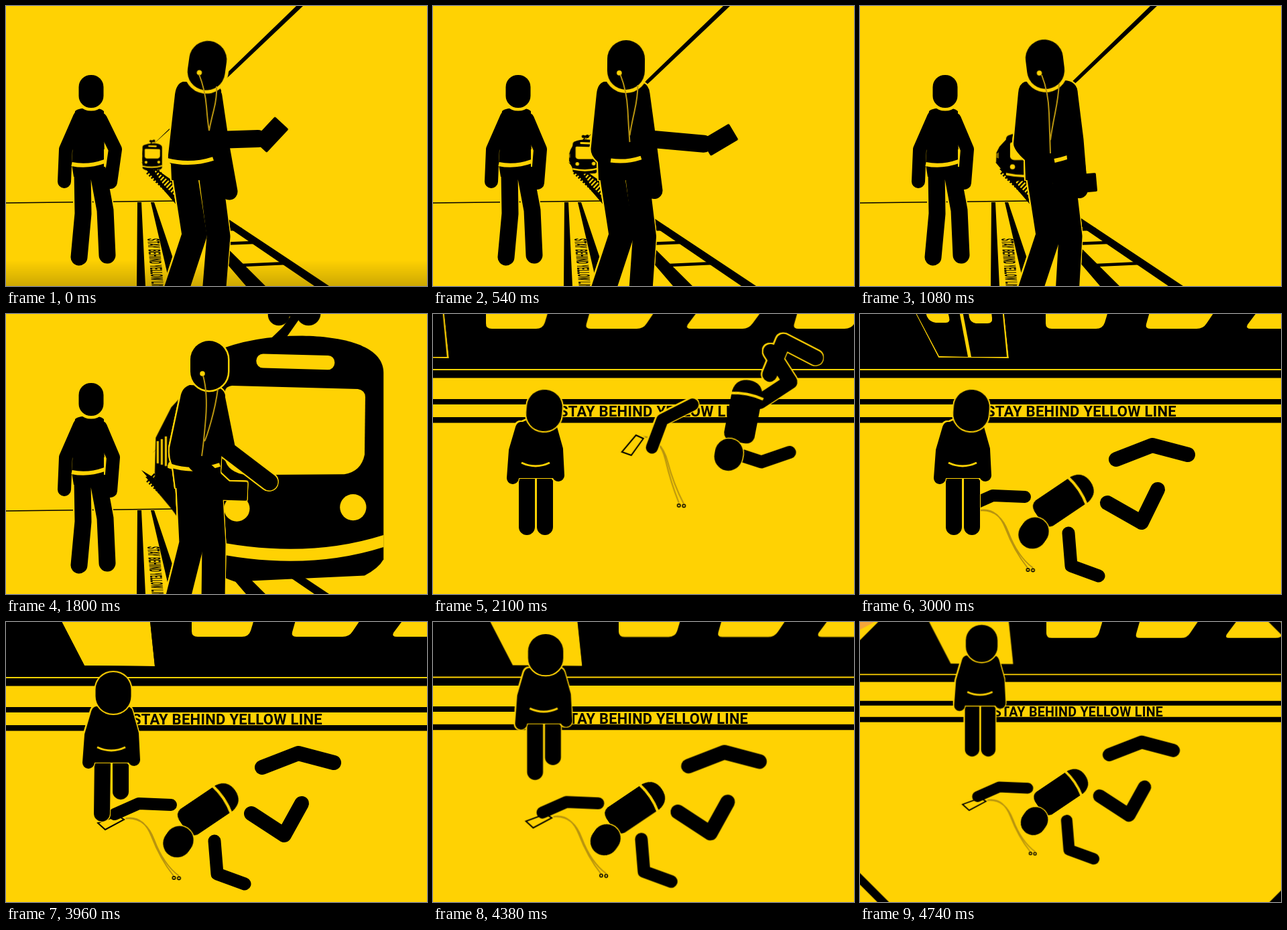
These frames come from a looping animation (628x418 px, 4.8 s). An HTML page:

```html
<!DOCTYPE html>
<html lang="en">
<head>
<meta charset="utf-8">
<title>Stay behind yellow line</title>
<style>
:root { --y: #ffd203; }
html, body { margin: 0; width: 100%; height: 100%; overflow: hidden; background: var(--y); }
svg { display: block; width: 628px; height: 418px; }
text { font: 700 22px Roboto, sans-serif; letter-spacing: .3px; }
.a { animation: 4.8s ease-in-out infinite; }
.lin { animation-timing-function: linear; }
.cut { animation-timing-function: step-end; }
.limb { fill: none; stroke: #000; stroke-linecap: round; stroke-linejoin: round; }
.line { fill: none; stroke: var(--y); }
.cord { fill: none; stroke: #b8940f; stroke-width: 2; }
.yel { fill: var(--y); }
.head { stroke: var(--y); stroke-width: 9; paint-order: stroke; }
.edge {
  filter: drop-shadow(1.3px 0 var(--y)) drop-shadow(-1.3px 0 var(--y))
          drop-shadow(0 1.3px var(--y)) drop-shadow(0 -1.3px var(--y));
}

/* scenes */
#platform { animation-name: platform; }
#track { animation-name: track; }
#shade { animation-name: shade; }
@keyframes platform { 0% { visibility: visible } 42.5%, 100% { visibility: hidden } }
@keyframes track { 0% { visibility: hidden } 42.5%, 100% { visibility: visible } }
@keyframes shade { 0% { opacity: 1 } 8%, 100% { opacity: 0 } }

/* approaching tram */
#tram { animation-name: tram; }
@keyframes tram {
  0% { transform: translate(218px, 225px) scale(.11) }
  11.25% { transform: translate(227px, 225px) scale(.142) }
  22.5% { transform: translate(244px, 225px) scale(.2) }
  27.5% { transform: translate(262px, 224px) scale(.273) }
  31.25% { transform: translate(286px, 222px) scale(.375) }
  33.75% { transform: translate(312px, 221px) scale(.5) }
  36.25% { transform: translate(368px, 218px) scale(.75) }
  37.5% { transform: translate(426px, 215px) scale(1) }
  38.75% { transform: translate(546px, 209px) scale(1.5) }
  40% { transform: translate(786px, 197px) scale(2.5) }
  42.5%, 100% { transform: translate(1350px, 170px) scale(5) }
}
#side { animation-name: side; transform-origin: -115px 0; }
@keyframes side { 0% { transform: scaleX(.2) } 22.5%, 100% { transform: none } }

/* walker */
#face { animation-name: face; }
@keyframes face {
  0% { transform: translate(300px, 89px) rotate(8deg) }
  22.5% { transform: translate(276px, 87px) rotate(-7deg) }
  37.5%, 100% { transform: translate(303px, 77px) }
}
#skin { animation-name: skin; }
@keyframes skin { 0%, 22.5% { stroke-width: 10 } 37.5%, 100% { stroke-width: 5 } }
#chest { animation-name: chest; }
@keyframes chest {
  0% { d: path("M264 113Q254 116 252 132L242 222Q241 232 246 236L247 260L326 260L323 235L321 126Q318 117 308 114Z") }
  22.5% { d: path("M246 113Q237 116 236 130L229 205Q229 215 246 230L247 260L326 260L330 235L324 124Q320 112 306 111Z") }
  37.5%, 100% { d: path("M274 106Q262 110 260 125L244 200Q243 215 249 228L253 260L322 260L320 235L327 122Q326 112 312 108Z") }
}
#belt { animation-name: belt; }
@keyframes belt {
  0% { d: path("M240 230Q275 239 309 228") }
  22.5% { d: path("M290 231Q300 229 312 225") }
  37.5%, 100% { d: path("M244 226Q280 238 319 225") }
}
#legL { animation-name: legL; }
@keyframes legL {
  0%, 22.5% { d: path("M268 258L281 342L252 430") }
  37.5%, 100% { d: path("M273 258L277 342L255 430") }
}
#legR { animation-name: legR; }
@keyframes legR {
  0% { d: path("M306 258L317 344L310 430") }
  22.5% { d: path("M304 258L314 344L309 430") }
  37.5%, 100% { d: path("M305 258L310 344L309 430") }
}
#reach { animation-name: reach; }
@keyframes reach {
  0% { d: path("M300 150L314 200L376 198") }
  13% { d: path("M300 150L318 198L405 206") }
  22.5% { d: path("M309 126L319 200L327 274") }
  37.5%, 100% { d: path("M290 140L284 222L328 263") }
}
#swing { animation-name: swing; }
@keyframes swing {
  0% { d: path("M310 135L321 210L333 277") }
  22.5% { d: path("M312 128L321 200L327 274") }
  37.5%, 100% { d: path("M315 128L330 203L393 251") }
}
#phone { animation-name: phone; }
@keyframes phone {
  0% { transform: translate(395px, 192px) rotate(-47deg) }
  13% { transform: translate(429px, 200px) rotate(-30deg) }
  22.5% { transform: translate(329px, 265px) rotate(-5deg) }
  37.5%, 100% { transform: translate(336px, 264px) rotate(2deg) }
}
#wires { animation-name: wires; }
@keyframes wires {
  0% { d: path("M288 102Q297 125 299 150T303 186M314 120Q315 135 310 155T303 186") }
  22.5% { d: path("M271 103Q281 128 282 160T284 220M297 116Q296 135 291 160T284 200") }
  37.5%, 100% { d: path("M294 92Q301 118 298 155T292 212M316 112Q313 135 306 160T296 190") }
}
#idle { animation-name: idle; }
@keyframes idle {
  0% { d: path("M141 169L163 214L156 263") }
  12%, 100% { d: path("M141 169L160 214L156 264") }
}

/* second scene */
#cam { animation-name: cam; animation-timing-function: ease-in; }
@keyframes cam {
  0%, 88.75% { transform: none }
  98.75% { transform: translate(30.6px, 4.3px) scale(.893) }
  100% { transform: translate(35px, 5px) scale(.878) }
}
#cars { animation-name: cars; }
@keyframes cars {
  0%, 42.5% { transform: translateX(-260px) }
  46% { transform: translateX(-90px) }
  49.5% { transform: translateX(-22px) }
  52.5% { transform: translateX(-4px) }
  62.5%, 100% { transform: none }
}
#doorL { animation-name: doorL; }
#doorR { animation-name: doorR; }
@keyframes doorL { 0%, 69% { transform: none } 79%, 100% { transform: translateX(-90px) } }
@keyframes doorR { 0%, 69% { transform: none } 79%, 100% { transform: translateX(90px) } }

#parts { animation-name: parts; }
@keyframes parts {
  0%, 42.5% { transform: translate(110px, -130px) }
  47.5% { transform: translate(42px, -52px) }
  52.5%, 100% { transform: none }
}
#p1 { animation-name: p1; }
@keyframes p1 {
  0%, 42.5% { d: path("M410 200L430 150L478 175") }
  52.5% { d: path("M396 212L433 172L482 194") }
  61%, 100% { d: path("M382 217L436 196L489 210") }
}
#p2 { animation-name: p2; }
@keyframes p2 {
  0%, 42.5% { d: path("M410 165L440 210L395 240") }
  52.5% { d: path("M435 199L434 252L380 274") }
  62.5% { d: path("M444 262L420 311L369 282") }
  70%, 100% { d: path("M441 271L415 318L366 286") }
}
#p3 { animation-name: p3; }
@keyframes p3 {
  0%, 42.5% { d: path("M350 315L398 330L440 315") }
  52.5% { d: path("M335 326L371 361L417 362") }
  61%, 100% { d: path("M311 327L315 376L356 391") }
}
#p4 { animation-name: p4; }
@keyframes p4 {
  0%, 42.5% { d: path("M235 310L250 268L295 245") }
  52.5% { d: path("M199 295L232 266L278 257") }
  61%, 100% { d: path("M162 287L198 271L246 273") }
}
#trunk { animation-name: trunk; }
@keyframes trunk {
  0%, 42.5% { transform: translate(372px, 255px) rotate(-80deg) }
  52.5% { transform: translate(340px, 267px) rotate(-52deg) }
  62.5% { transform: translate(305px, 277px) rotate(-34deg) }
  70%, 100% { transform: translate(303px, 278px) rotate(-34deg) }
}
#skull { animation-name: skull; }
@keyframes skull {
  0%, 42.5% { transform: translate(350px, 320px) rotate(10deg) }
  52.5% { transform: translate(300px, 324px) rotate(25deg) }
  62.5% { transform: translate(259px, 327px) rotate(35deg) }
  70%, 100% { transform: translate(257px, 328px) rotate(35deg) }
}
#cell { animation-name: cell; }
@keyframes cell {
  0%, 52.5% { d: path("M210 291L221 296L203 321L189 316Z") }
  61%, 100% { d: path("M137 300L148 310L176 295L167 289Z") }
}
#lead { animation-name: lead; }
@keyframes lead {
  0%, 52.5% { d: path("M220 293Q246 294 254 328T274 392M220 293Q248 296 257 330T281 393") }
  61%, 100% { d: path("M174 294Q204 286 217 320T250 379M174 294Q207 288 221 325T258 379") }
}
#buds { animation-name: buds; }
@keyframes buds { 0%, 52.5% { transform: translate(274px, 396px) } 61%, 100% { transform: translate(250.5px, 382px) } }

/* watcher */
#watcher { animation-name: watcher; }
@keyframes watcher {
  0%, 72% { transform: none }
  82.5% { transform: translate(4px, -35px) }
  94%, 100% { transform: translate(13px, -110px) }
}
#look { animation-name: look; }
@keyframes look {
  0%, 70% { transform: translate(166px, 144px) rotate(5deg) }
  80%, 100% { transform: translate(156px, 141px) }
}
#stepL { animation-name: stepL; }
@keyframes stepL {
  0%, 72% { d: path("M140 235L140 318") }
  77% { d: path("M140 235L140 292") }
  82.5% { d: path("M140 235L139 321") }
  87.5% { d: path("M140 235L140 292") }
  91%, 100% { d: path("M140 235L140 318") }
}
#stepR { animation-name: stepR; }
@keyframes stepR {
  0%, 77% { d: path("M167 235L167 318") }
  82.5% { d: path("M167 235L167 288") }
  87.5% { d: path("M167 235L167 318") }
  91% { d: path("M167 235L167 294") }
  95%, 100% { d: path("M167 235L167 318") }
}
</style>
</head>
<body>
<svg viewBox="0 0 628 418">
  <linearGradient id="dusk" x2="0" y2="1">
    <stop stop-opacity="0"/><stop offset="1" stop-opacity=".2"/>
  </linearGradient>

  <g id="platform" class="a cut">
    <path d="M218 208L433 0H443L326 111Z"/>
    <path d="M0 294L250 291" class="limb" stroke-width="1.6"/>
    <path d="M196 293H202L208 418H195ZM216 293H221L263 418H245Z"/>
    <text transform="matrix(.025 .272 -1.12 0 211 347)">STAY BEHIND YELLOW LINE</text>
    <path d="M208 243L211 243L387 418H358ZM220 243L223 243L333 319L482 418H460L328 328Z"/>
    <path d="M202 233L220 244L250 290Z"/>
    <path d="M215 244L262 289" fill="none" stroke="#000" stroke-width="17" stroke-dasharray="2.5 2.2"/>
    <g class="limb" stroke-width="4.5">
      <path d="M300 334L350 333M320 355L370 353M352 387L418 384"/>
    </g>

    <g id="tram" class="a lin">
      <g id="side" class="a lin">
        <path d="M-115 -145L-180 -75L-203 -30L-205 45L-180 75L-115 165Z"/>
        <path class="line" stroke-width="3" d="M-200 -25V8M-194 -28V10M-188 -32V12"/>
      </g>
      <circle cx="-21" cy="-212" r="16"/><circle cx="23" cy="-214" r="18"/>
      <path class="limb" stroke-width="13" d="M-18 -178L10 -218M-18 -216H24"/>
      <path d="M-131 -130Q-131 -150 -115 -158Q-60 -181 14 -181C70 -180 134 -168 134 -126V150Q127 163 106 174L-86 183Q-125 170 -131 150Z"/>
      <rect class="yel" x="-58" y="-153" width="116" height="21" rx="10" transform="rotate(1.5)"/>
      <path class="yel" d="M-90 -107L96 -102Q107 -100 107 -90L106 -5Q101 20 76 24L-68 25Q-97 22 -101 0V-95Q-101 -106 -90 -107Z"/>
      <circle class="yel" cx="-83" cy="75" r="19"/><circle class="yel" cx="89" cy="73" r="19.5"/>
      <path class="yel" d="M-131 120Q14 152 134 114V132Q14 170 -131 138Z"/>
    </g>

    <g class="edge">
      <path class="limb" stroke-width="20" d="M110 166L89 214L87 262"/>
      <path id="idle" class="a limb" stroke-width="20"/>
      <path class="limb" stroke-width="25" d="M114 248L115 310L109 375M137 246L148 305L151 372"/>
    </g>
    <path d="M103 157Q108 152 127 152Q141 152 146 157L147 236L148 255L101 255L98 236Z"/>
    <path class="line" stroke-width="6" d="M98 236Q122 241 147 232"/>
    <path class="line" stroke-width="2" d="M147 214V240"/>
    <rect class="head" x="108.5" y="103" width="37" height="49" rx="18"/>

    <g class="edge">
      <path id="legR" class="a limb" stroke-width="35"/>
      <path id="legL" class="a limb" stroke-width="37"/>
      <path id="chest" class="a"/>
      <path id="belt" class="a line" stroke-width="6"/>
      <path id="reach" class="a limb" stroke-width="26"/>
      <rect id="phone" class="a" x="-24" y="-14" width="48" height="28" rx="2"/>
      <path id="swing" class="a limb" stroke-width="25"/>
    </g>
    <g id="face" class="a">
      <rect id="skin" class="a head" x="-28" y="-37" width="56" height="74" rx="28"/>
      <circle class="yel" cx="-10" cy="12" r="3.8"/>
    </g>
    <path id="wires" class="a cord"/>
    <rect id="shade" class="a lin" y="378" width="628" height="40" fill="url(#dusk)"/>
  </g>

  <g id="track" class="a cut">
    <g id="cam" class="a">
      <rect class="yel" x="-200" y="-100" width="1100" height="700"/>
      <path d="M-200 -100H900V82H-200ZM-200 84H900V95.5H-200ZM-200 127H900V135H-200ZM-200 154H900V162.5H-200Z"/>
      <text x="472" y="153" text-anchor="end">STAY BEHIND YELLOW LINE</text>
      <clipPath id="gap"><path d="M73 -20L117 65L222 66L213 -20Z"/></clipPath>
      <g id="cars" class="a lin">
        <g class="yel">
          <path id="win" d="M437 -20L427 15Q425 22 433 22H502Q512 22 517 14L540 -20Z"/>
          <path d="M277 -20V14Q277 22 286 22H352Q362 22 365 13L375 -20Z"/>
          <path d="M605 -20L578 16Q575 22 583 22H660Q669 22 675 14L700 -20Z"/>
          <use href="#win" x="310"/><use href="#win" x="450"/>
        </g>
        <g clip-path="url(#gap)">
          <path class="yel" d="M73 -20L117 65L222 66L213 -20Z"/>
          <g id="doorL" class="a">
            <path d="M74 -20L118 63L161 64L145 -20Z"/>
            <path class="yel" d="M92 -20L100 4Q104 12 113 13H128Q135 13 133 5L127 -20Z"/>
          </g>
          <g id="doorR" class="a">
            <path d="M150 -20L166 64L219 64L211 -20Z"/>
            <path class="yel" d="M159 -20L163 5Q165 13 173 14H190Q198 14 197 6L194 -20Z"/>
          </g>
        </g>
      </g>

      <g id="parts" class="a lin">
        <path id="lead" class="a cord"/>
        <g id="buds" class="a" fill="#ffd203" stroke="#000" stroke-width="1.5">
          <circle r="2.2"/><circle cx="7.5" cy=".5" r="2.2"/>
        </g>
        <g class="edge">
          <path id="p1" class="a limb" stroke-width="22"/>
          <path id="p2" class="a limb" stroke-width="22"/>
          <path id="p3" class="a limb" stroke-width="19"/>
          <path id="cell" class="a" fill="#ffd203" stroke="#000" stroke-width="2"/>
          <path id="p4" class="a limb" stroke-width="18"/>
        </g>
        <g id="trunk" class="a">
          <path d="M-36 -23H27Q47 -20 47 0T27 23H-36Q-47 21 -47 8V-10Q-46 -22 -36 -23Z"/>
          <path class="line" stroke-width="4" d="M23 -25Q29 0 23 25"/>
        </g>
        <rect id="skull" class="a head" x="-21" y="-24" width="42" height="48" rx="21" style="stroke-width:3"/>
      </g>

      <g id="watcher" class="a lin">
        <g class="edge">
          <path id="stepL" class="a lin limb" stroke-width="24"/>
          <path id="stepR" class="a lin limb" stroke-width="24"/>
        </g>
        <g class="edge">
          <path class="limb" stroke-width="18" d="M132 170L122 204L119 245M176 170L185 202L187 241"/>
          <path d="M136 160Q152 153 172 160Q184 165 187 182L181 245H127L122 182Q125 165 136 160Z"/>
        </g>
        <path class="line" stroke-width="3" d="M132 222Q153 232 174 222"/>
        <rect id="look" class="a head" x="-26.5" y="-31" width="53" height="62" rx="26" style="stroke-width:4"/>
      </g>

      <path d="M332 -331L893 230L332 791L-229 230Z" fill="none" stroke="#000" stroke-width="14"/>
      <path d="M332 -391L953 230L332 851L-289 230Z" class="line" stroke-width="71"/>
      <path d="M-60 -40H0L-12 -4L-34 8H-60Z" fill="#f5a53a"/>
    </g>
  </g>
</svg>
</body>
</html>
```
